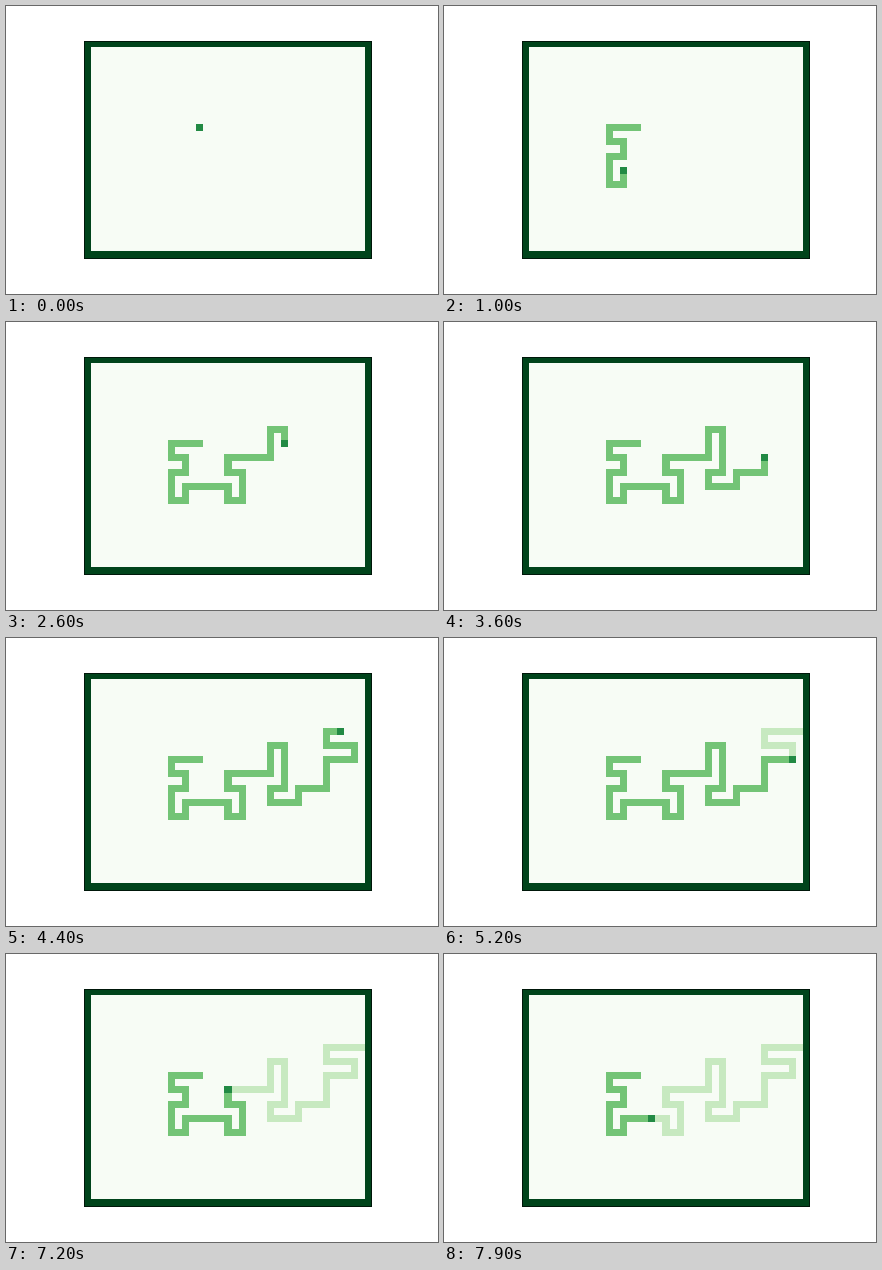
Animation, 432 px wide and 288 px high, one loop 8 s. Source, as an HTML page with a canvas:

```html
<!DOCTYPE html>
<html lang="en">
<head>
<meta charset="utf-8">
<title>Maze walk</title>
<style>
html, body { margin: 0; width: 432px; height: 288px; overflow: hidden; background: #fff; }
canvas { display: block; }
</style>
</head>
<body>
<canvas id="stage" width="432" height="288"></canvas>
<script>
const ctx = document.getElementById('stage').getContext('2d');
const STEP = 100, LOOP = 8000;
const COLOR = {
  floor: '#f7fcf5', done: '#c7e9c0', trail: '#73c476',
  head: '#228a44', wall: '#00441b', edge: '#00170a'
};
const DIR = { L: [-1, 0], R: [1, 0], U: [0, -1], D: [0, 1] };
const MOVES = 'LLDRDLDDRURRRDRUULURRRUURDDDLDRRURRUURRULLURR';

// Each move crosses two grid cells.
const cells = [[16, 12]];
for (const move of MOVES) {
  const [dx, dy] = DIR[move];
  for (let i = 0; i < 2; i++) {
    const [x, y] = cells[cells.length - 1];
    cells.push([x + dx, y + dy]);
  }
}
// Dead end against the right wall
cells.push([39, 8]);

const px = col => Math.round(78 + 7.024 * col);
const py = row => Math.round(34.03 + 7.03 * row);

function box(color, x0, y0, x1, y1) {
  ctx.fillStyle = color;
  ctx.fillRect(x0, y0, x1 - x0, y1 - y0);
}

function cell(color, [col, row]) {
  box(color, px(col), py(row), px(col + 1), py(row + 1));
}

function draw(n) {
  const turn = MOVES.length;
  const back = n > turn;
  const head = 2 * (back ? 2 * turn + 1 - n : n);
  box('#fff', 0, 0, 432, 288);
  box(COLOR.edge, 78, 35, 366, 253);
  box(COLOR.wall, 79, 36, 365, 252);
  box(COLOR.floor, px(1), py(1), px(40), py(30));
  cells.forEach((c, i) => {
    if (i < head) cell(COLOR.trail, c);
    else if (i === head) cell(COLOR.head, c);
    else if (back) cell(COLOR.done, c);
  });
}

const start = performance.now();
let shown = -1;
function tick() {
  const n = Math.floor((performance.now() - start) % LOOP / STEP);
  if (n !== shown) draw(shown = n);
  requestAnimationFrame(tick);
}
tick();
</script>
</body>
</html>
```
